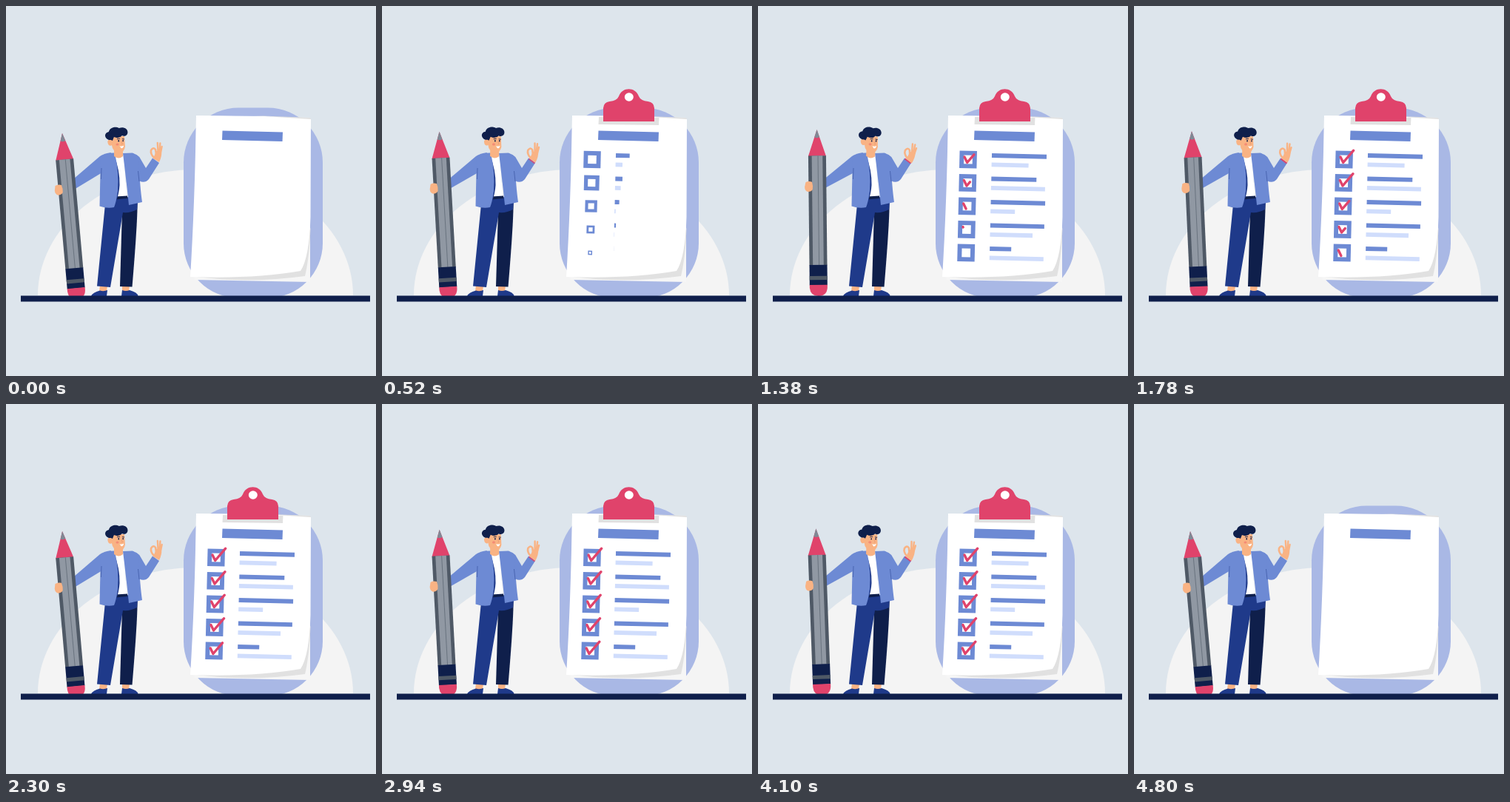
An HTML page with a canvas for the animation above (4840 ms loop, 500 by 500 pixels).

```html
<!DOCTYPE html>
<html lang="en">
<head>
<meta charset="utf-8">
<title>Checklist</title>
<style>
html, body { margin: 0; width: 100%; height: 100%; overflow: hidden; background: #dde5ec; }
canvas { display: block; width: 500px; height: 500px; }
</style>
</head>
<body>
<canvas id="stage" width="500" height="500"></canvas>
<script>
const ctx = document.getElementById('stage').getContext('2d');
const LOOP = 4840, SWING = 2400, EXIT = 4380;
const NAVY = '#0f1f4b', ROYAL = '#1f3a8a', BLUE = '#6d8ad4', PALE = '#d0ddfc';
const PINK = '#e0436b', SKIN = '#f9b384', GRAY = '#e1e1e1', SLATE = '#4f5966', STEEL = '#9098a3';

const clamp = v => Math.max(0, Math.min(1, v));
const ease = v => (1 - Math.cos(Math.PI * clamp(v))) / 2;

function fill(path, color) {
  ctx.fillStyle = color;
  ctx.fill(new Path2D(path));
}

function stroke(path, color, width) {
  ctx.strokeStyle = color;
  ctx.lineWidth = width;
  ctx.stroke(new Path2D(path));
}

function rect(x, y, w, h, color) {
  ctx.fillStyle = color;
  ctx.fillRect(x, y, w, h);
}

function oval(x, y, rx, ry, color, angle = 0) {
  ctx.fillStyle = color;
  ctx.beginPath();
  ctx.ellipse(x, y, rx, ry, angle, 0, Math.PI * 2);
  ctx.fill();
}

function at(x, y, degrees, scale, draw) {
  if (scale <= 0) return;
  ctx.save();
  ctx.translate(x, y);
  ctx.rotate(degrees * Math.PI / 180);
  ctx.scale(scale, scale);
  draw();
  ctx.restore();
}

function drawBackdrop() {
  rect(0, 0, 500, 500, '#dde5ec');
  ctx.fillStyle = '#f4f4f4';
  ctx.beginPath();
  ctx.ellipse(256, 391, 213, 170, 0, Math.PI, Math.PI * 2);
  ctx.fill();
  ctx.fillStyle = '#a9b8e5';
  ctx.beginPath();
  ctx.roundRect(240, 137.5, 188, 257, 74);
  ctx.fill();
}

function drawPaper() {
  fill('M257 148 L411 151 L411 373 L255 370 Z', '#f6f6f6');
  fill('M335 148 L411 151 L412 154 Z', GRAY);
  fill('M257 366 Q330 375 404 365 Q410 340 411.5 300 L390 340 Z', GRAY);
  fill('M257 148 L350 149 L412 153 L411.5 285 Q410 340 398 358 Q335 369 249 366 Q255 270 257 148 Z', '#fff');
  fill('M292.5 168.5 L374 170.5 L373.5 183 L292 181 Z', BLUE);
}

function drawClip(scale) {
  at(333.5, 156, 0, scale, () => {
    fill('M-40.5 -6 L41 -5 L40.5 5 L-41 4 Z', GRAY);
    fill('M-34.5 0 V-18 Q-34 -26 -26 -27 Q-16 -28 -13.5 -34 C-9 -47 9 -47 13.5 -34 ' +
         'Q16 -28 26 -27 Q34 -26 34.5 -18 V0 Z', PINK);
    oval(0.3, -33, 6, 5.8, '#fff');
  });
}

function drawBar(x, y, length, color) {
  if (length > 0) at(x, y, 1.35, 1, () => rect(0, -2.9, length, 5.8, color));
}

// Traces the short arm first, then the long one.
function drawTick(p) {
  if (p <= 0) return;
  const bend = 0.28;
  const a = Math.min(1, p / bend), b = clamp((p - bend) / (1 - bend));
  let path = `M-5 -3.5 L${-5 + 3.7 * a} ${-3.5 + 7.5 * a}`;
  if (b > 0) path += ` L${-1.3 + 14 * b} ${4 - 16.3 * b}`;
  ctx.lineCap = ctx.lineJoin = 'round';
  stroke(path, PINK, 3.4);
}

const ROWS = [[74, 50], [61, 73], [73.5, 33], [73, 57.5], [29, 73]];

function drawList(t, out) {
  ROWS.forEach(([dark, light], i) => {
    const y = 31.5 * i, x = -0.7 * i;
    const start = 340 + 45 * i;
    drawBar(316 + x, 202 + y, dark * ease((t - start + 20) / 600) * out, BLUE);
    drawBar(315.6 + x, 214.4 + y, light * ease((t - start - 10) / 600) * out, PALE);
    at(284 + x, 207.5 + y, 1.35, ease((t - 150 - 60 * i) / 400) * out, () => {
      rect(-11.7, -11.7, 23.4, 23.4, BLUE);
      rect(-5.8, -5.8, 11.6, 11.6, '#fff');
    });
    at(284 + x, 207.5 + y, 0, out, () => drawTick(clamp((t - 780 - 195 * i) / 800)));
  });
}

function drawLegs() {
  fill('M127 377 H137 L136 386 H126 Z M157 377 H167 L166 386 H157 Z', SKIN);
  fill('M115 392 Q117 387 127 384.5 Q132 386 137 384 L136 392 Z', ROYAL);
  fill('M156 392 L157 384 Q162 386 167 384 Q178 387 178.5 392 Z', ROYAL);
  fill('M157 276 L177.5 266 Q178 290 170.5 379.5 L154 379 Z', NAVY);
  fill('M134 268 L148 258 H164 L178 265 L177 275 Q168 280 158 279 L141 380 L123 378.5 Z', ROYAL);
}

function drawTorso() {
  fill('M147 199 L159 199 L163 257.5 L147 259 Z', '#fff');
  fill('M148 257.5 L164 256.5 V260 L148 261.5 Z', NAVY);
  fill('M146 202 Q154 222 153.5 242 Q153 252 149 264 L143 250 Z', ROYAL);
  fill('M158 199 L171 198.5 Q178 201 179.5 210 Q181 245 184 265 L166 269 Q163 240 158 199 Z', BLUE);
  fill('M128 203 Q136 198 147 198.5 Q153 225 151 250 Q149 265 146 272 Q137 274 126.5 270.5 Z', BLUE);
  stroke('M129 219 L128.5 234 M178.5 223 L180 237', '#405ca9', 0.8);
}

function drawHead(k) {
  at(152, 203, 4.3 * k - 0.2, 1, () => {
    fill('M-6 -14 L6 -10 L6 0 Q0 5 -6 0 Z', SKIN);
    fill('M-9 -27 H8 L9 -13 Q8 -6 2 -5 Q-8 -5 -9 -15 Z', SKIN);
    oval(-11, -18.5, 3.4, 4.2, SKIN, -0.3);
    fill('M-13 -22 C-20 -25 -19 -32 -13 -33 C-12 -39 -4 -41 1 -38 C6 -40 12 -38 12.5 -33 ' +
         'C13 -28 8 -26 5 -28 Q1 -23 -6 -26 L-8 -21 L-10 -22 Z', NAVY);
    oval(0.3, -20.7, 0.9, 1.2, NAVY);
    oval(6.2, -20.9, 0.8, 1.2, NAVY);
    stroke('M-2 -23.3 L2 -23.6 M5 -23.4 L8 -23', NAVY, 0.9);
    oval(-1.5, -16, 2, 1.6, '#f48c75');
    stroke('M4 -20 L5.5 -16.5 L4 -16', '#e8976d', 0.7);
    fill('M1.5 -13.8 Q5 -13 7.2 -14.5 Q6.5 -10.5 3.8 -10.8 Z', '#fff');
  });
}

function drawRightArm(k) {
  fill('M168 199 Q178 199 182 207 L189 219 L198 205.5 L207 212 L193 234 Q187 240.5 180 236 L172 216 Z', BLUE);
  ctx.globalAlpha = clamp(2 * k);
  stroke('M198.5 206.5 L206.5 212.5', PINK, 2);
  ctx.globalAlpha = 1;
  at(203 + k, 209 + k, 8 * k, 1, () => {
    ctx.lineCap = ctx.lineJoin = 'round';
    fill('M-4 -3 L0 -13 L7 -13 Q8 -6 4 2 Z', SKIN);
    stroke('M2.5 -12 L1.8 -24 M4.5 -12 L5.3 -23.5 M6 -11 L7.6 -19', SKIN, 2.4);
    stroke('M-3 -4 Q-8 -9 -7 -14 Q-4 -19 -1 -15 L0 -9', SKIN, 2.6);
  });
}

function drawLeftArm(k) {
  const y = 1.5 * k;
  fill(`M142 198 Q133 199 127 203 L88 ${236.5 - y} L92 ${248 - 2 * y} L130 225 Z`, BLUE);
}

function drawPencil(k) {
  at(76 + 3.75 * k, 172 - 5.4 * k, -5.1 + 4.75 * k, 1, () => {
    fill('M0 0 L12 36 H-12 Z', PINK);
    fill('M0 0 L3.4 10.5 Q0 12 -3.4 10.5 Z', '#7f8995');
    rect(-12, 35.5, 24, 148, SLATE);
    rect(-7.3, 35.5, 14.6, 148, STEEL);
    rect(0.6, 35.5, 1, 148, '#69737f');
    rect(-12, 183, 24, 27.5, NAVY);
    rect(-12, 198, 24, 5.2, SLATE);
    fill('M-12 210 H12 V214 Q11 225 0 225 Q-11 225 -12 214 Z', PINK);
  });
  at(71.3 - 2.8 * k, 248.5 - 4.8 * k, -8 + 6 * k, 1, () => {
    fill('M-4 -6 Q0 -8 4.5 -6 Q6 -1 5 4 Q3 7.5 -2 7 Q-6 5 -5.5 0 Z', SKIN);
  });
}

function draw(t) {
  const k = (1 - Math.cos(2 * Math.PI * Math.min(t, 4800) / SWING)) / 2;
  const out = 1 - ease((t - EXIT) / (4790 - EXIT));
  drawBackdrop();
  drawPaper();
  drawClip(ease(t / 420) * out);
  drawList(t, out);
  drawLegs();
  drawLeftArm(k);
  drawRightArm(k);
  drawTorso();
  drawHead(k);
  drawPencil(k);
  rect(20, 391.5, 472, 8, NAVY);
}

const begin = performance.now();
function tick() {
  draw((performance.now() - begin) % LOOP);
  requestAnimationFrame(tick);
}
tick();
</script>
</body>
</html>
```
